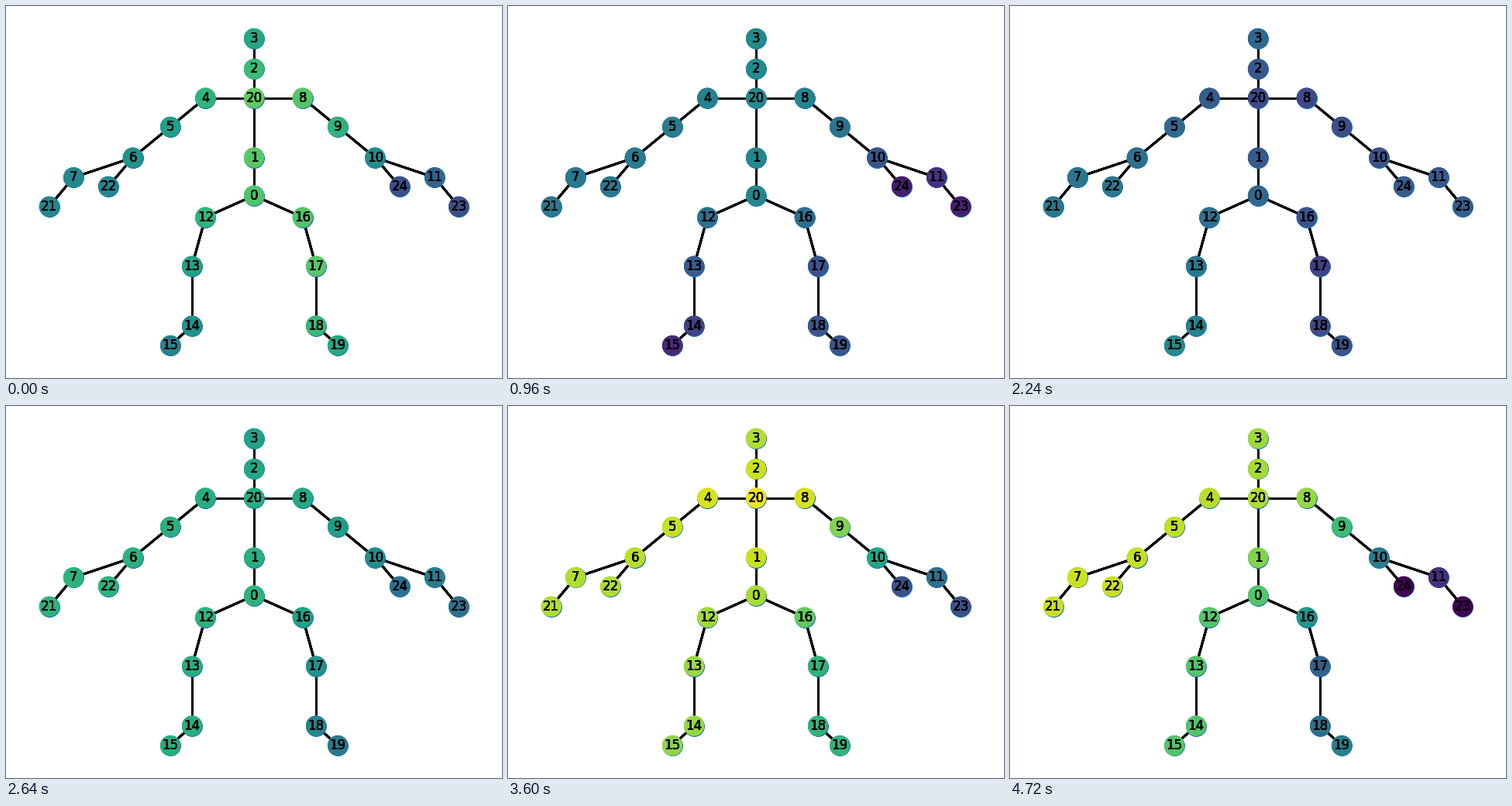
A matplotlib script for the animation above (4.8 s loop, 640 by 480 pixels).

```python
import numpy as np
import matplotlib.pyplot as plt
from matplotlib.animation import FuncAnimation
from matplotlib.collections import LineCollection

W, H, DPI = 640, 480, 100
FRAMES, INTERVAL = 60, 80
CENTRE = W / 2

# Limb joints as (left id, right id, distance from the centre line, y)
PAIRS = [
    (4, 8, 62.7, 118.6), (5, 9, 108, 155.9), (6, 10, 156.3, 195.6),
    (7, 11, 233, 221.3), (21, 23, 264.2, 258.7), (22, 24, 188, 232.8),
    (12, 16, 62.7, 272.6), (13, 17, 80, 335.6), (14, 18, 80, 412.6),
    (15, 19, 108, 438.1),
]
SPINE = {3: 41.8, 2: 81.4, 20: 118.6, 1: 195.6, 0: 244.6}

# Activation in percent of a few joints over time; the rest is blended
KEY_TIMES = [0, 5, 12, 28, 37, 45, 59]
HEAD, NECK, HIP, HAND_L, HAND_R, FOOT_L, KNEE_R, FOOT_R = 3, 20, 0, 21, 23, 15, 17, 19
KEY_LEVELS = {
    HEAD: (60, 78, 48, 33, 78, 88, 85),
    NECK: (76, 94, 47, 22, 93, 97, 88),
    HIP: (72, 97, 46, 33, 90, 87, 73),
    HAND_L: (46, 79, 40, 40, 84, 88, 92),
    HAND_R: (24, 5, 8, 29, 44, 25, 0),
    FOOT_L: (45, 69, 11, 48, 73, 83, 73),
    KNEE_R: (74, 88, 26, 19, 77, 65, 31),
    FOOT_R: (60, 79, 26, 26, 52, 65, 44),
}


def linear(t):
    return t


def ease_out(t):
    return 1 - (1 - t) ** 2


def late_smooth(t):
    s = t ** 1.3
    return s * s * (3 - 2 * s)


# Limbs between two keyed joints, with the blend along each
LIMBS = [
    ((HEAD, 2, NECK), linear),
    ((NECK, 1, HIP), linear),
    ((NECK, 4, 5, 6, 7, HAND_L), ease_out),
    ((NECK, 8, 9, 10, 11, HAND_R), late_smooth),
    ((HIP, 12, 13, 14, FOOT_L), linear),
    ((HIP, 16, KNEE_R), linear),
    ((KNEE_R, 18, FOOT_R), linear),
]
# Thumbs as (wrist, thumb, hand whose level it shares)
THUMBS = [(6, 22, HAND_L), (10, 24, HAND_R)]


def joint_positions():
    pos = {j: (CENTRE, y) for j, y in SPINE.items()}
    for left, right, dx, y in PAIRS:
        pos[left] = (CENTRE - dx, y)
        pos[right] = (CENTRE + dx, y)
    return np.array([pos[j] for j in range(len(pos))])


def joint_levels():
    """Activation of every joint (columns) in every frame (rows)."""
    t = np.arange(FRAMES)
    level = {j: np.interp(t, KEY_TIMES, v) / 100 for j, v in KEY_LEVELS.items()}
    for limb, ease in LIMBS:
        start, end = level[limb[0]], level[limb[-1]]
        for i, joint in enumerate(limb[1:-1], 1):
            level[joint] = start + (end - start) * ease(i / (len(limb) - 1))
    for _, thumb, hand in THUMBS:
        level[thumb] = level[hand]
    return np.column_stack([level[j] for j in range(len(level))])


points = joint_positions()
levels = joint_levels()
chains = [limb for limb, _ in LIMBS] + [thumb[:2] for thumb in THUMBS]
bones = [(points[a], points[b])
         for chain in chains for a, b in zip(chain, chain[1:])]

fig = plt.figure(figsize=(W / DPI, H / DPI), dpi=DPI, facecolor="white")
ax = fig.add_axes((0, 0, 1, 1))
ax.set_xlim(0, W)
ax.set_ylim(H, 0)
ax.axis("off")

# Everything is stacked several times, which hardens the smoothed outlines
STACK = 6
disc = dict(s=300, linewidths=1.5)
nodes = []
for _ in range(STACK):
    ax.add_collection(LineCollection(bones, colors="black", linewidths=2, zorder=1))
    # Plain discs leave a thin blue rim around the coloured ones
    ax.scatter(*points.T, c="#1f78b4", zorder=2, **disc)
    for j, (x, y) in enumerate(points):
        ax.text(x, y, str(j), size=12, family="DejaVu Sans", color="black",
                ha="center", va="center", zorder=4)
for _ in range(2):
    nodes.append(ax.scatter(*points.T, c=levels[0], cmap="viridis",
                            vmin=0, vmax=1, zorder=3, **disc))


def update(frame):
    for layer in nodes:
        layer.set_array(levels[frame])
    return nodes


anim = FuncAnimation(fig, update, frames=FRAMES, interval=INTERVAL,
                     repeat=True, repeat_delay=0)
plt.show()
```
